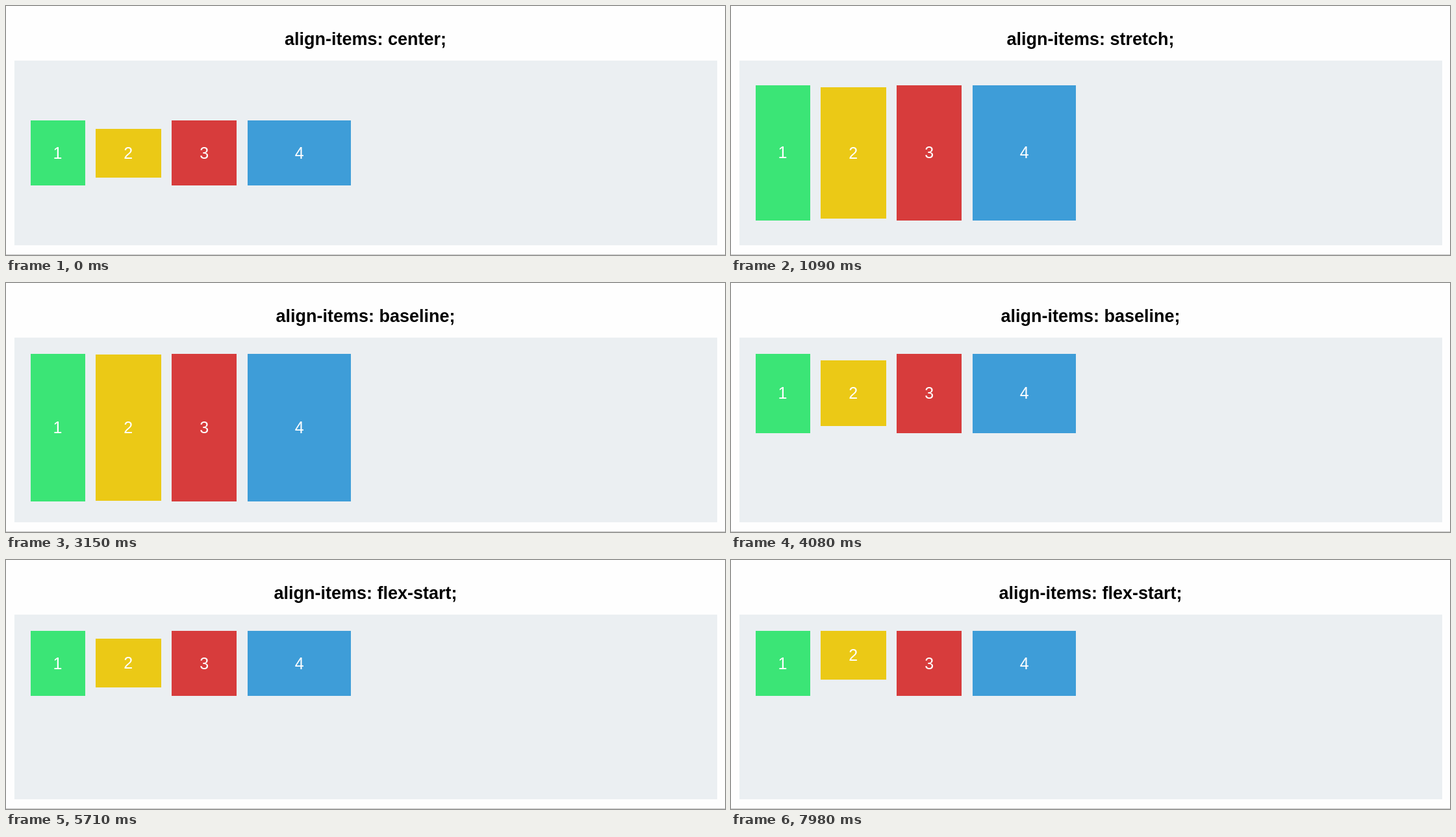
Recreate the animation shown at these times as an HTML page. Size 1107 by 383 pixels, loop 8 s.

```html
<!DOCTYPE html>
<html lang="en">
<head>
<meta charset="utf-8">
<title>align-items</title>
<style>
  html, body { margin: 0; width: 100%; height: 100%; overflow: hidden; background: #fefefe; }
  body { position: relative; font-family: "Liberation Sans", Helvetica, Arial, sans-serif; }
  h1 {
    position: absolute; left: 0; top: 31px; width: 1107px; margin: 0;
    font-size: 27px; line-height: 40px; text-align: center; color: #000;
  }
  .container { position: absolute; left: 13px; top: 84px; width: 1082px; height: 284px; background: #ebeff2; }
  .rule { position: absolute; left: 0; top: 382px; width: 1107px; height: 1px; background: #c4c4c4; }

  /* The script moves --t (ms) along the paused timeline. */
  .item {
    position: absolute; display: flex; align-items: center; justify-content: center;
    font-size: 25px; color: #fff;
    animation: tall 8s infinite paused;
    animation-delay: calc(var(--t, 0) * -1ms);
  }
  .one   { left: 37.5px;  width: 84px;    background: #3be576; }
  .two   { left: 138px;   width: 100.5px; background: #ebc916; animation-name: short; }
  .three { left: 255px;   width: 100.4px; background: #d73c3c; }
  .four  { left: 372px;   width: 159.3px; background: #3e9dd8; }

  @keyframes tall {
    0%, 0.875%      { top: 176px; height: 100px; animation-timing-function: ease; }
    25.875%, 37.5%  { top: 109px; height: 234px; animation-timing-function: ease; }
    62.5%, 100%     { top: 109px; height: 100px; }
  }
  @keyframes short {
    0%, 0.875%      { top: 188.6px; height: 75px;  animation-timing-function: ease; }
    25.875%, 37.5%  { top: 109px;   height: 234px; animation-timing-function: ease; }
    62.5%, 71.25%   { top: 121.3px; height: 75px;  animation-timing-function: ease; }
    96.25%, 100%    { top: 109px;   height: 75px; }
  }
</style>
</head>
<body>
<h1>align-items: center;</h1>
<div class="container"></div>
<div class="item one">1</div>
<div class="item two">2</div>
<div class="item three">3</div>
<div class="item four">4</div>
<div class="rule"></div>
<script>
  const LOOP = 8000, FIRST = 70, STEP = 66.8;
  const titles = [[0, 'center'], [FIRST, 'stretch'], [3009, 'baseline'], [5709, 'flex-start']];
  const heading = document.querySelector('h1');

  function draw() {
    const time = performance.now() % LOOP;
    // Motion advances about 15 times a second.
    const stepped = Math.max(0, FIRST + Math.floor((time - FIRST) / STEP) * STEP);
    document.body.style.setProperty('--t', stepped);

    const value = titles.filter(([start]) => time >= start).pop()[1];
    const text = `align-items: ${value};`;
    if (heading.textContent !== text) heading.textContent = text;
    requestAnimationFrame(draw);
  }
  draw();
</script>
</body>
</html>
```
